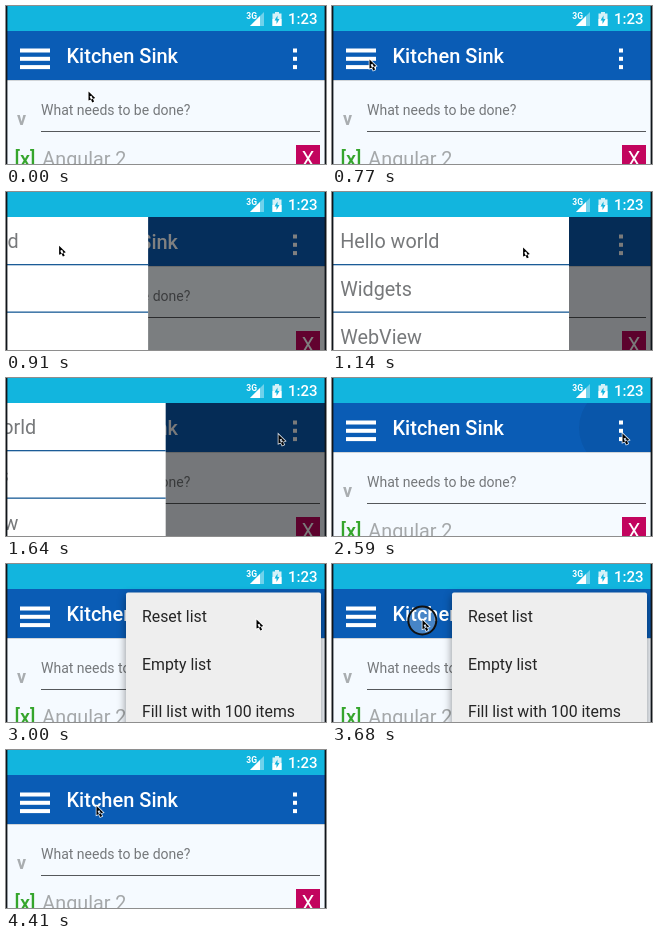
Animation, 320 px wide and 158 px high, one loop 4.46 s. Source, as an HTML page with a canvas:

```html
<!DOCTYPE html>
<html lang="en">
<head>
<meta charset="utf-8">
<title>App demo</title>
<style>
html, body { margin: 0; width: 100%; height: 100%; overflow: hidden; background: #000; }
canvas { display: block; width: 320px; height: 158px; }
</style>
</head>
<body>
<canvas id="stage" width="320" height="158"></canvas>
<script>
const W = 320, H = 158, LOOP = 4460;
const BAR = 25, PAGE = 74, DRAWER = 237, HOLD = 140;
const ctx = document.getElementById('stage').getContext('2d');

// The pointer leaves for each place, rests there and presses
const home = { x: 82, y: 85 };
const burger = { x: 37, y: 53, leave: 80, press: 600 };
const shade = { x: 272, y: 56, leave: 830, press: 1445 };
const dots = { x: 290, y: 55, leave: 1760, press: 2400 };
const title = { x: 90, y: 55.5, leave: 2800, press: 3600 };
const clicks = [burger, shade, dots, title];

const progress = (t, from, span) => Math.min(1, Math.max(0, (t - from) / span));
const easeOut = u => 1 - (1 - u) ** 3;
const smooth = u => u * u * (3 - 2 * u);
const mix = (a, b, u) => a + (b - a) * u;

function rect(x, y, w, h, color) {
  ctx.fillStyle = color;
  ctx.fillRect(x, y, w, h);
}

function text(str, x, y, size, color, weight = 400) {
  ctx.font = `${weight} ${size}px Roboto, sans-serif`;
  ctx.fillStyle = color;
  ctx.fillText(str, x, y);
}

function disc(x, y, r, color) {
  ctx.beginPath();
  ctx.arc(x, y, r, 0, 2 * Math.PI);
  ctx.fillStyle = color;
  ctx.fill();
}

// Right triangle with its square corner at x, y
function corner(x, y, dx, dy, color) {
  ctx.beginPath();
  ctx.moveTo(x, y);
  ctx.lineTo(x + dx, y);
  ctx.lineTo(x, y + dy);
  ctx.fillStyle = color;
  ctx.fill();
}

function drawStatus() {
  const blue = '#12b5de';
  rect(0, 0, W, BAR, blue);
  corner(258, 20, -14, -14, 'rgba(255,255,255,.4)');
  corner(254, 20, -10, -10, '#fff');
  text('3G', 240.3, 12.5, 8.5, '#fff', 700);
  rect(269, 6, 4, 2, '#d4f1f8');
  rect(266.5, 7.5, 9, 12.5, '#d4f1f8');
  rect(266.5, 13, 9, 7, '#fff');
  corner(271.5, 14.5, -3, -5, blue);
  corner(270.5, 13, 3, 5, blue);
  text('1:23', 282, 18, 15, '#fff', 500);
}

function drawPage(t) {
  rect(0, BAR, W, H, '#f5faff');
  rect(0, BAR, W, PAGE - BAR, '#0a5cb5');
  rect(0, PAGE, W, 1, 'rgba(0,0,0,.15)');
  drawRipple(t);
  for (let i = 0; i < 3; i++) {
    const y = 42.5 + 8.3 * i;
    rect(14, y, 30, 4, '#fff');
    rect(287, y, 4, 4, '#fff');
  }
  text('Kitchen Sink', 60.5, 56.5, 20, '#fff', 500);

  text('v', 11, 118.5, 18, '#a9adb0', 700);
  text('What needs to be done?', 35, 108.5, 14, '#75787b');
  rect(35, 125, 279, 1, '#55585b');
  text('[x]', 8.5, 159.5, 20, '#35a52c', 500);
  text('Angular 2', 36.3, 160, 19.8, '#a5a8aa');
  rect(290, 139, 24, 24, '#c2045e');
  text('X', 295.7, 160, 20, '#fff');
}

function drawRipple(t) {
  const grow = easeOut(progress(t, dots.press, 200));
  ctx.save();
  ctx.beginPath();
  ctx.rect(0, BAR, W, PAGE - BAR);
  ctx.clip();
  ctx.globalAlpha = .07 * grow * (1 - progress(t, dots.press + 200, 250));
  disc(289, 50, 42 * grow, '#00001e');
  ctx.restore();
}

function drawDrawer(t) {
  const open = easeOut(progress(t, burger.press + 240, 270)) - easeOut(progress(t, shade.press + 159, 300));
  if (!open) return;
  rect(0, BAR, W, H, `rgba(0,0,0,${.52 * Math.min(1, 1.6 * open)})`);
  ctx.save();
  ctx.translate(DRAWER * (open - 1), 0);
  rect(0, BAR, DRAWER, H, '#fff');
  ['Hello world', 'Widgets', 'WebView'].forEach((label, i) => {
    text(label, 8.2, 56 + 47.8 * i, 19.8, '#77797b');
    rect(0, 72 + 47.5 * i, DRAWER, 1.3, '#1b5c97');
  });
  ctx.restore();
}

function drawMenu(t) {
  const show = smooth(progress(t, dots.press + 240, 200)) * (1 - progress(t, title.press + 120, 160));
  if (!show) return;
  ctx.save();
  ctx.globalAlpha = show;
  ctx.shadowColor = 'rgba(0,0,0,.45)';
  ctx.shadowBlur = 8;
  ctx.shadowOffsetY = 3;
  ctx.beginPath();
  ctx.roundRect(120, 28.5, 195, 170, 2);
  ctx.fillStyle = '#eee';
  ctx.fill();
  ctx.shadowColor = 'transparent';
  ['Reset list', 'Empty list', 'Fill list with 100 items'].forEach((label, i) =>
    text(label, 136, 58 + 47.5 * i, 15.85, '#252525'));
  ctx.restore();
}

function pointerAt(t) {
  return clicks.reduce((at, c) => {
    const u = smooth(progress(t, c.leave, c.press - 100 - c.leave));
    return { x: mix(at.x, c.x, u), y: mix(at.y, c.y, u) };
  }, home);
}

function arrow() {
  const shape = new Path2D();
  shape.moveTo(.5, .5);
  shape.lineTo(.5, 9.5);
  shape.lineTo(7.2, 7);
  shape.closePath();
  const tail = new Path2D();
  tail.rect(-1, 5, 2, 6.5);
  shape.addPath(tail, new DOMMatrix().translate(.5, .5).rotate(-24));
  return shape;
}

function drawPointer(t) {
  const { x, y } = pointerAt(t);
  ctx.save();
  ctx.translate(x, y);
  if (clicks.some(c => t >= c.press && t < c.press + HOLD)) {
    disc(.3, 1, 14, 'rgba(255,255,255,.25)');
    ctx.strokeStyle = '#111';
    ctx.lineWidth = 2;
    ctx.stroke();
  }
  const shape = arrow();
  ctx.strokeStyle = 'rgba(255,255,255,.85)';
  ctx.lineWidth = 1.6;
  ctx.stroke(shape);
  ctx.fillStyle = '#000';
  ctx.fill(shape);
  ctx.restore();
}

function draw(t) {
  drawPage(t);
  drawDrawer(t);
  drawStatus();
  drawMenu(t);
  for (const x of [0, W - 1.4]) rect(x, 0, 1.4, H, '#10151a');
  drawPointer(t);
}

const start = performance.now();
function tick() {
  draw((performance.now() - start) % LOOP);
  requestAnimationFrame(tick);
}
tick();
</script>
</body>
</html>
```
